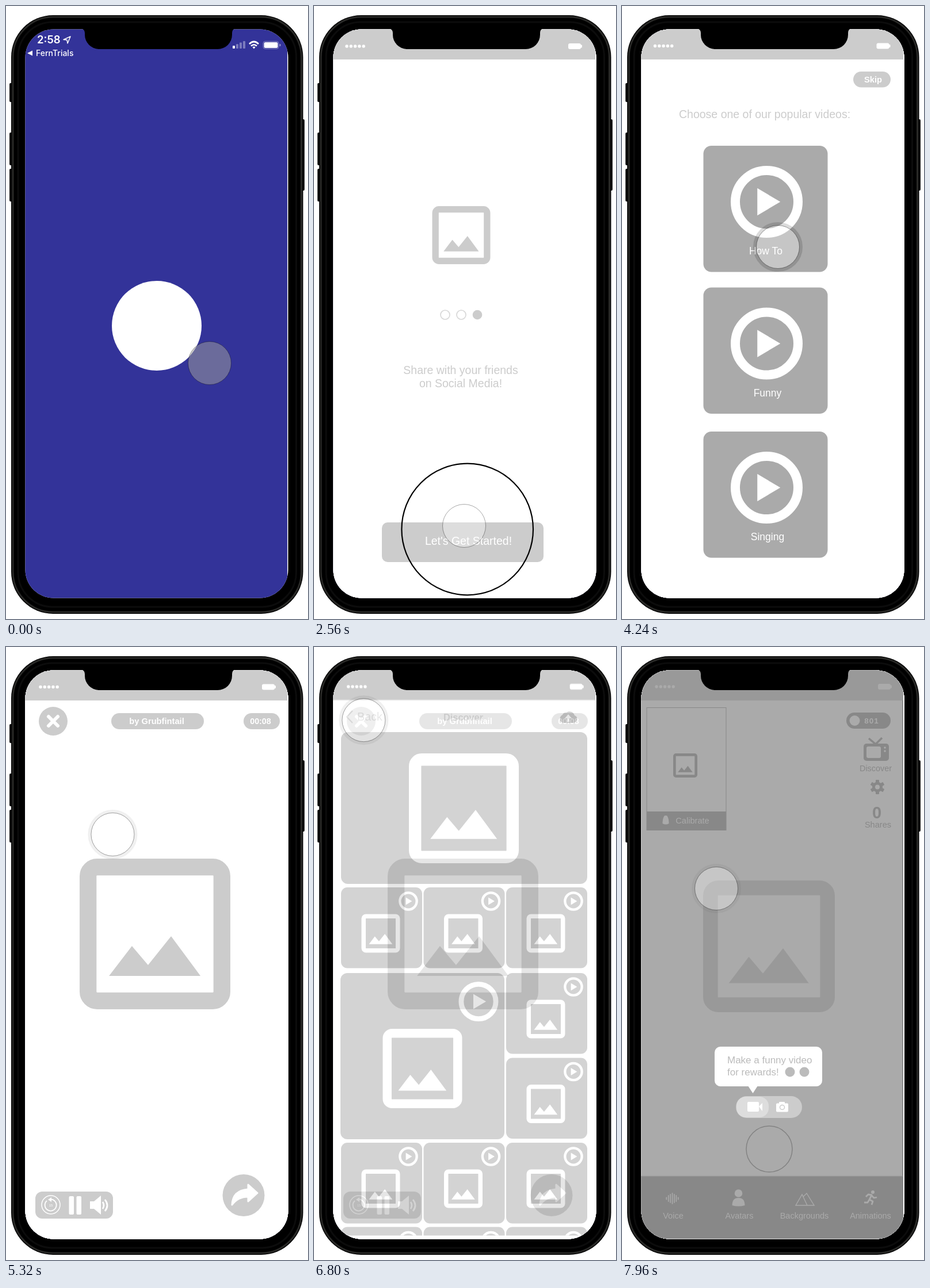
Recreate the animation shown at these times as an HTML page. Size 525 px wide and 1066 px high, loop 8 s.

```html
<!DOCTYPE html>
<html lang="en">
<head>
<meta charset="utf-8">
<title>App walkthrough</title>
<style>
html, body { margin: 0; width: 100%; height: 100%; overflow: hidden; background: #fff; }
svg { display: block; width: 100%; height: 100%; }
text { font-family: "Liberation Sans", Arial, sans-serif; }
.ui { font-family: Inter, sans-serif; }
</style>
</head>
<body>
<svg id="stage" viewBox="0 0 525 1066"></svg>
<script>
const LOOP = 8000;
const LIGHT = '#ccc', MID = '#aaa', DARK = '#999';

// Drawing helpers, each returns SVG markup
const box = (x, y, w, h, r, fill, more = '') =>
  `<rect x="${x}" y="${y}" width="${w}" height="${h}" rx="${r}" fill="${fill}" ${more}/>`;
const disc = (x, y, r, fill, more = '') => `<circle cx="${x}" cy="${y}" r="${r}" fill="${fill}" ${more}/>`;
const shape = (d, fill, more = '') => `<path d="${d}" fill="${fill}" ${more}/>`;
const line = (d, color, w, more = '') => shape(d, 'none', `stroke="${color}" stroke-width="${w}" ${more}`);
const label = (s, x, y, size, fill, more = 'text-anchor="middle"') =>
  `<text x="${x}" y="${y}" font-size="${size}" fill="${fill}" ${more}>${s}</text>`;
const bold = 'text-anchor="middle" font-weight="700"';
const left = 'text-anchor="start"';

function picture(x, y, s, color) {
  const w = s * .112;
  const peaks = [[.195, .779], [.347, .58], [.454, .706], [.607, .515], [.802, .779]]
    .map(([a, b]) => [x + a * s, y + b * s].join()).join(' ');
  return box(x + w / 2, y + w / 2, s - w, s - w, s * .06, 'none', `stroke="${color}" stroke-width="${w}"`) +
    `<polygon points="${peaks}" fill="${color}"/>`;
}

const play = (x, y, r) =>
  disc(x, y, r * .872, 'none', `stroke="#fff" stroke-width="${r * .256}"`) +
  shape(`M${x - r * .26} ${y - r * .38}L${x + r * .38} ${y}L${x - r * .26} ${y + r * .38}z`, '#fff');

const person = (x, y, k, color) =>
  disc(x, y - 7 * k, 6.8 * k, color) +
  shape(`M${x - 11 * k} ${y + 14 * k}q0 -13 ${11 * k} -13t${11 * k} 13q-${11 * k} 3 -${22 * k} 0z`, color);

function statusBar(bottom, dx, y) {
  let s = box(33, 40, 456, bottom - 40, 0, LIGHT);
  for (let i = 0; i < 5; i++) s += disc(57 + dx + i * 7.3, y, 2.7, '#fff');
  return s + box(442 + dx, y - 5, 22, 10, 3, '#fff') + box(463 + dx, y - 2.5, 3, 5, 1, '#fff');
}

const blank = box(33, 40, 458, 990, 0, '#fff');

function splash() {
  let bars = '';
  for (let i = 0; i < 4; i++)
    bars += box(394 + i * 6, 69 - i * 2.7, 4, 5 + i * 2.7, 1, '#fff', i ? 'opacity=".35"' : '');
  return blank + box(33, 40, 456, 990, 0, '#339') +
    disc(262, 556, 78, '#fff') +
    label('2:58', 54, 65, 18.5, '#fff', 'class="ui" font-weight="600"') +
    line('M100 58.5L112 53L107 65L106 59z', '#fff', 1.5, 'stroke-linejoin="round"') +
    shape('M37 82L46 77.5V86.5z', '#fff') +
    label('FernTrials', 52, 87, 14, '#fff', 'class="ui" font-weight="500"') +
    bars +
    line('M423 66Q431 58 439 66M426 69.5Q431 65 436 69.5', '#fff', 2.6) +
    shape('M428.5 71.5Q431 69.5 433.5 71.5L431 74.5z', '#fff') +
    box(447, 61.5, 27, 13, 3.5, 'none', 'stroke="#fff" stroke-opacity=".4"') +
    box(448.5, 63, 24, 10, 2.5, '#fff') + box(475.5, 66, 2, 4, 1, '#fff', 'opacity=".5"');
}

function intro(step, lines, x, align, button) {
  let s = blank + statusBar(93, 0, 70) + picture(205.5, 348, 101, LIGHT);
  for (let i = 0; i < 3; i++)
    s += disc(228 + i * 28, 537, i === step ? 8.3 : 8, i === step ? LIGHT : '#fff',
      i === step ? '' : 'stroke="#d8d8d8" stroke-width="1.7"');
  lines.forEach((t, i) => s += label(t, x, 639.5 + i * 23.5, 19.5, LIGHT, `text-anchor="${align}"`));
  return s + box(118, 898, 281, 69, 10, LIGHT) + label(button, button === 'Next' ? 256 : 268.5, 937, 19.5, '#fff');
}

function videos() {
  const cards = [['How To', 243, 250], ['Funny', 489.5, 253], ['Singing', 740, 253]];
  return blank + statusBar(93, .5, 69.5) +
    box(402, 114, 65, 27.5, 13.7, LIGHT) + label('Skip', 436.5, 133, 14.7, '#fff', bold) +
    label('Choose one of our popular videos:', 99, 195, 19.5, LIGHT, left) +
    cards.map(([name, y, x]) => box(141.5, y, 216, 219.5, 14, MID) +
      play(251.5, y + 97.5, 62.5) + label(name, x, y + 189, 17.5, '#fff')).join('');
}

function player() {
  return blank + statusBar(93, 3, 69.5) +
    disc(82, 129, 25, LIGHT) + line('M74 121L90 137M90 121L74 137', '#fff', 6, 'stroke-linecap="round"') +
    box(183, 115, 161, 28, 14, LIGHT) + label('by Grubfintail', 262, 134, 14.7, '#fff', bold) +
    box(413, 115, 63, 28, 14, LIGHT) + label('00:08', 442.5, 134, 14.3, '#fff', bold) +
    picture(128, 368, 262, LIGHT) +
    box(51, 947, 135, 47, 12, LIGHT) +
    disc(78, 970, 16, 'none', 'stroke="#fff" stroke-width="1.5"') +
    line('M71 963A10 10 0 1 0 78 960.5', '#fff', 1.8) + shape('M79 957L73 961L79 965z', '#fff') +
    label('15', 78, 973, 6, '#fff') +
    box(109.5, 955, 8.5, 32, 2, '#fff') + box(122.5, 955, 8.5, 32, 2, '#fff') +
    shape('M146 964H153L165 954V987L153 977H146z', '#fff') +
    line('M168 965Q172 971 168 977M172 961Q180 971 172 981', '#fff', 2.8) +
    disc(413, 953.5, 36.5, LIGHT) +
    shape('M393 970Q394 945 421 943V935L437 949.5L421 964V956Q403 956 393 970z', '#fff',
      'stroke="#fff" stroke-width="3" stroke-linejoin="round"');
}

function discover() {
  const card = (x, y) => box(x, y, 141, 140.5, 11, MID) + picture(x + 35.5, y + 46.5, 67, '#fff') + play(x + 117, y + 24, 16.8);
  const row = y => [47, 190.5, 334].map(x => card(x, y)).join('');
  return blank + statusBar(91.5, 2.5, 68.5) +
    line('M67 111L57 121.5L67 132', '#bbb', 2.2) + label('Back', 75, 128, 19.8, '#bbb', left) +
    label('Discover', 259.5, 128, 16.4, LIGHT, bold) +
    shape('M433 132a7.5 7.5 0 0 1 -1 -14a6.5 6.5 0 0 1 7 -4a9 9 0 0 1 14 5a6.8 6.8 0 0 1 -1 13z', MID) +
    shape('M442 117L448 124H444V131H440V124H436z', '#fff') +
    `<g clip-path="url(#list)">` +
    box(47, 148, 428, 264, 12, MID) + picture(165, 185, 191, '#fff') +
    row(418) +
    box(46, 567, 285, 289, 12, MID) + picture(119.5, 664, 138, '#fff') + play(286, 616.5, 34.5) +
    card(334, 567) + card(334, 714.5) + row(862) + row(1008.5) + `</g>`;
}

function home() {
  let gear = disc(444, 243.5, 6.5, 'none', `stroke="${DARK}" stroke-width="5"`);
  for (let a = 0; a < 360; a += 60)
    gear += box(441, 231, 6, 6, 1, DARK, `transform="rotate(${a} 444 243.5)"`);
  let wave = '';
  [5, 12, 16, 20, 16, 12, 5].forEach((h, i) => wave += box(76.5 + i * 3.4, 959 - h / 2, 1.6, h, .8, '#fff'));
  const tabs = [['Voice', 89], ['Avatars', 204], ['Backgrounds', 317], ['Animations', 432]];
  return blank + statusBar(93, 3, 69) +
    box(43, 105.5, 138, 213, 0, '#fff', `stroke="${DARK}"`) + box(43, 286, 138, 33, 0, DARK) +
    picture(89, 185, 42, DARK) + person(76, 300, .5, '#fff') + label('Calibrate', 122.5, 306.5, 14.6, '#fff') +
    box(390, 114, 77, 28, 14, DARK) + disc(404.5, 128, 9, '#fff') +
    label('801', 434, 133, 13.5, '#fff', bold + ' letter-spacing="1"') +
    line('M429 159L441 169L452 158', DARK, 3.5) + box(420, 168, 44, 30, 5, DARK) +
    box(425, 173, 25, 20, 3, '#fff') + disc(457, 175, 1.7, '#fff') + disc(457, 181, 1.7, '#fff') +
    label('Discover', 441, 215.5, 14.4, DARK) + gear +
    label('0', 443, 298, 29, DARK, bold) + label('Shares', 445, 314, 14.6, DARK) +
    picture(141, 406, 229, LIGHT) +
    disc(256, 873, 40, 'none', 'stroke="#888" stroke-width="1.5"') +
    line('M488 93V920', '#888', 1.5) +
    box(33, 920, 456, 110, 0, DARK) + line('M33 920H489', '#ddd', 1) +
    tabs.map(([t, x]) => label(t, x, 994, 14.5, '#fff')).join('') +
    wave + person(202.5, 957, 1, '#fff') +
    line('M302 971L313 952L322 971zM315 956L321 950L334 971H322', '#fff', 1.4) +
    disc(436, 948, 3, '#fff') +
    line('M424 956L428 952L434 953L430 961L436 964L434 970M430 961L427 966H421M434 954L438 958L443 957', '#fff', 2.8,
      'stroke-linejoin="round"');
}

const tip = () =>
  box(33, 40, 456, 988, 0, '#808080', 'opacity=".667"') +
  box(161, 695, 187, 69, 10, '#fff') + shape('M219 763H236L227.5 776z', '#fff') +
  label('Make a funny video', 183, 724, 17, '#bbb', left) + label('for rewards!', 183, 744.5, 17, '#bbb', left) +
  disc(292, 739, 8.5, '#bbb') + disc(317, 739, 8.5, '#bbb') +
  box(198, 781, 115, 38, 19, LIGHT) + box(199, 782, 56, 36, 16, '#ddd') +
  box(218, 791, 20, 17, 2, '#fff') + shape('M238 799L244 793V807z', '#fff') +
  box(268, 793.5, 21, 15, 2, '#fff') + box(273, 791, 10, 5, 1, '#fff') +
  disc(278.5, 800.5, 4, 'none', 'stroke="#ccc" stroke-width="1.5"');

// Screens stack up: [start, fade length, markup]
const screens = [
  [0, 0, splash()],
  [400, 160, intro(0, ['Select an Avatar that', 'fits your personality!'], 172, 'start', 'Next')],
  [1480, 40, intro(1, ['Record your own', 'funny videos!'], 255, 'middle', 'Next')],
  [2200, 40, intro(2, ['Share with your friends', 'on Social Media!'], 255, 'middle', "Let's Get Started!")],
  [2640, 120, videos()],
  [4380, 40, player()],
  [6760, 80, discover()],
  [7640, 80, home()],
  [7740, 160, tip()]
];

// Pointer: [time, x, y, ring opacity]
const path = [
  [0, 354, 621, 0], [600, 270, 760, .07], [760, 270, 760, .07], [920, 262, 797, .07], [1160, 261, 904, 0],
  [2760, 261, 904, 0], [3900, 271, 419, .05], [4240, 271, 419, .14], [4640, 271, 419, .05],
  [5440, 180, 320, .06], [6280, 76, 180, .07], [6440, 82, 131, .07], [7120, 90, 124, .05],
  [7440, 98, 119, .1], [7640, 98, 119, .05], [7960, 164, 420, .04], [8000, 164, 420, .04]
];

// Taps: [start, end, x, y]
const taps = [
  [1200, 1480, 261, 904], [1960, 2200, 261, 904], [2290, 2580, 266.7, 910],
  [4260, 4400, 271, 419], [6480, 6740, 82, 131], [7450, 7640, 98, 119]
];

stage.innerHTML = `<defs>
  <clipPath id="screen">${box(33.5, 40.5, 457, 989, 49, '#000')}</clipPath>
  <clipPath id="list">${box(33, 140, 458, 883.5, 0, '#000')}</clipPath></defs>` +
  [[6, 134, 33], [6, 220, 57], [6, 283, 57], [512, 197, 124]].map(([x, y, h]) => box(x, y, 7, h, 2, '#111')).join('') +
  box(9, 16, 507.5, 1041, 73, '#000') +
  box(12, 19, 501.5, 1035, 70, 'none', 'stroke="#292927" stroke-width="3"') +
  box(21, 28, 483.5, 1017, 60, 'none', 'stroke="#0c0c0c" stroke-width="3"') +
  `<g clip-path="url(#screen)">${screens.map(s => `<g class="page">${s[2]}</g>`).join('')}</g>` +
  shape('M131 39H398Q393 41 393 47V50A25 25 0 0 1 368 75H161A25 25 0 0 1 137 50V47Q137 41 131 39z', '#000') +
  `<circle id="ripple" fill="none" stroke="#000" stroke-width="2.2"/>
  <g id="pointer">${disc(0, 0, 40, 'none', 'id="ring" stroke="#000" stroke-width="6"')}
  ${disc(0, 0, 37.5, '#fff', 'id="dot" stroke="#000" stroke-opacity=".35"')}</g>`;

const pages = [...document.querySelectorAll('.page')];
const [ripple, pointer, ring, dot] = ['ripple', 'pointer', 'ring', 'dot'].map(id => document.getElementById(id));

function draw(t) {
  pages.forEach((page, i) => {
    const [start, fade] = screens[i];
    const o = t < start ? 0 : fade ? Math.min(1, (t - start) / fade) : 1;
    page.style.display = o ? '' : 'none';
    page.setAttribute('opacity', o);
  });

  const i = path.findIndex(k => k[0] > t);
  const a = path[i - 1], b = path[i];
  const u = (t - a[0]) / (b[0] - a[0]), e = u * u * (3 - 2 * u);
  const [, x, y, glow] = a.map((v, n) => v + (b[n] - v) * e);
  pointer.setAttribute('transform', `translate(${x} ${y})`);
  ring.setAttribute('opacity', glow);

  // The pointer starts grey and clears to a light glass
  const clear = Math.min(1, t / 500), grey = 157 + 98 * clear;
  dot.setAttribute('fill', `rgb(${grey},${grey},${grey})`);
  dot.setAttribute('fill-opacity', .53 - .2 * clear);

  const tap = taps.find(k => t >= k[0] && t < k[1]);
  ripple.style.display = tap ? '' : 'none';
  if (tap) {
    const p = (t - tap[0]) / (tap[1] - tap[0]);
    ripple.setAttribute('cx', tap[2]);
    ripple.setAttribute('cy', tap[3]);
    ripple.setAttribute('r', 37 + 77.3 * Math.min(1, p * 1.08));
  }
}

const begin = performance.now();
function tick() {
  draw((performance.now() - begin) % LOOP);
  requestAnimationFrame(tick);
}
tick();
</script>
</body>
</html>
```
